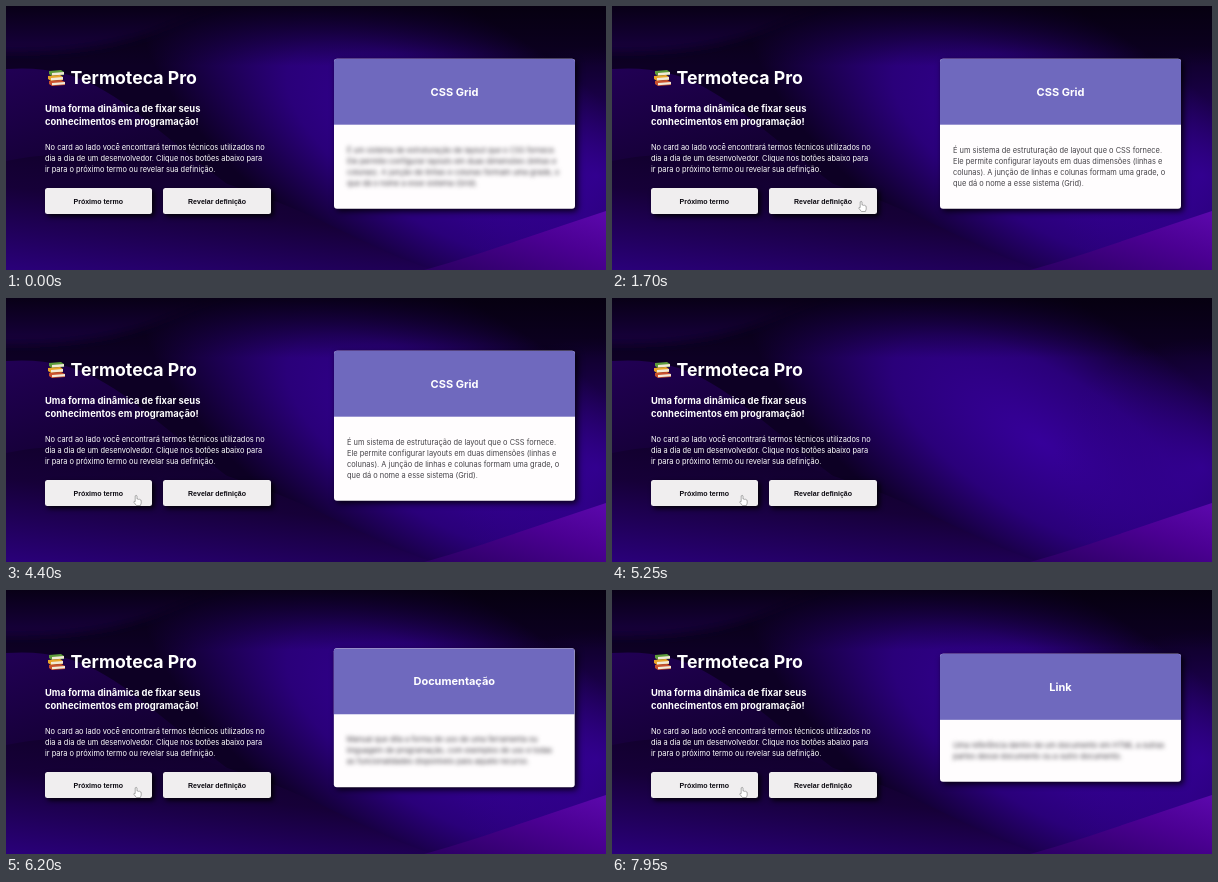
These frames come from a looping animation (600x264 px, 8 s). An HTML page:

```html
<!DOCTYPE html>
<html lang="pt-BR">
<head>
<meta charset="utf-8">
<title>Termoteca Pro</title>
<style>
  html, body { margin: 0; width: 100%; height: 100%; overflow: hidden; background: #090015; }
  body { position: relative; font-family: Inter, "Open Sans", sans-serif; color: #fff; white-space: nowrap; }
  body > * { position: absolute; margin: 0; }
  svg { display: block; overflow: visible; }
  #bg { left: 0; top: 0; }
  #books { left: 41px; top: 64px; }
  h1 { left: 64.6px; top: 60px; font: 700 17.7px/24px Inter, sans-serif; }
  h2 { left: 39px; top: 96px; font: 700 9.4px/13.3px Inter, sans-serif; }
  #intro { left: 39px; top: 135.6px; font-size: 7.43px; line-height: 11.1px; }
  button {
    top: 182px; width: 107.5px; height: 26.3px; padding: 0; border: 0; border-radius: 2.5px;
    background: #f0eeef; color: #0b0910; box-shadow: 2.5px 2.5px 5px #000d;
    font: 700 7px "Liberation Sans", Arial, sans-serif;
  }
  #next { left: 38.5px; }
  #reveal { left: 157.3px; }
  #card {
    left: 328px; top: 127.75px; width: 241px; border-radius: 3px; overflow: hidden;
    background: #fffdfe; box-shadow: 2.5px 2.5px 6px #000d;
  }
  #term { height: 66px; background: #6f69be; text-align: center; font: 700 11px/66px Inter, sans-serif; }
  #text { padding: 20px 13px; color: #454348; font-size: 7.45px; line-height: 11.15px; white-space: pre; }
  #hand { left: 0; top: 0; }
</style>
</head>
<body>
<svg id="bg" width="600" height="264">
  <defs>
    <radialGradient id="glow" gradientUnits="userSpaceOnUse" cx="0" cy="0" r="1"
      gradientTransform="translate(430 145) rotate(32) scale(340 140)">
      <stop offset="0" stop-color="#36009a"/>
      <stop offset=".5" stop-color="#2a007a"/>
      <stop offset="1" stop-color="#0d0024"/>
    </radialGradient>
    <radialGradient id="side" gradientUnits="userSpaceOnUse" cx="0" cy="0" r="1"
      gradientTransform="translate(590 170) scale(150 130)">
      <stop offset="0" stop-color="#36009a" stop-opacity=".8"/>
      <stop offset="1" stop-color="#30008a" stop-opacity="0"/>
    </radialGradient>
    <linearGradient id="left" x1="0" y1="0" x2=".55" y2="1">
      <stop offset="0" stop-color="#210054"/>
      <stop offset=".55" stop-color="#12002f"/>
      <stop offset="1" stop-color="#160039"/>
    </linearGradient>
    <linearGradient id="low" x1="0" y1="1" x2=".45" y2="0">
      <stop offset="0" stop-color="#2a007a"/>
      <stop offset=".6" stop-color="#160038"/>
      <stop offset="1" stop-color="#10002a"/>
    </linearGradient>
    <linearGradient id="hill" x1="0" y1="1" x2="1" y2="0">
      <stop offset="0" stop-color="#2b0062"/>
      <stop offset=".6" stop-color="#4b0093"/>
      <stop offset="1" stop-color="#5c08ad"/>
    </linearGradient>
    <linearGradient id="top" x1="0" y1="0" x2="0" y2="1">
      <stop offset="0" stop-color="#05000d" stop-opacity=".85"/>
      <stop offset="1" stop-color="#05000d" stop-opacity="0"/>
    </linearGradient>
    <filter id="soft"><feGaussianBlur stdDeviation="5"/></filter>
  </defs>
  <rect width="600" height="264" fill="url(#glow)"/>
  <rect width="600" height="264" fill="url(#side)"/>
  <path d="M-20 45Q90 50 160 20T290-20H-20Z" fill="#1d004b" filter="url(#soft)"/>
  <path d="M0 63C70 58 105 85 160 130S265 210 330 264H0Z" fill="url(#left)"/>
  <path d="M0 155C90 136 170 160 245 186S365 244 428 264H0Z" fill="url(#low)"/>
  <rect width="600" height="60" fill="url(#top)"/>
  <path d="M418 264C470 250 535 226 600 205V264Z" fill="url(#hill)"/>
</svg>

<svg id="books" width="18" height="16">
  <path d="M2 1L14 0L17 2V5L5 6L2 4Z" fill="#5d9c3b"/>
  <path d="M5 3L17 2V4.5L5 5.4Z" fill="#f1ead8"/>
  <path d="M1 6L13 5L16 7V10L4 11L1 9Z" fill="#e9a52b"/>
  <path d="M4 8L16 7V9.5L4 10.4Z" fill="#f1ead8"/>
  <path d="M2 11L14 10L18 12V15L5 16L2 14Z" fill="#c9502d"/>
  <path d="M5 13L18 12V14.3L5 15.3Z" fill="#f1ead8"/>
</svg>
<h1>Termoteca Pro</h1>
<h2>Uma forma dinâmica de fixar seus<br>conhecimentos em programação!</h2>
<p id="intro">No card ao lado você encontrará termos técnicos utilizados no<br>dia a dia de um desenvolvedor. Clique nos botões abaixo para<br>ir para o próximo termo ou revelar sua definição.</p>
<button id="next">Próximo termo</button>
<button id="reveal">Revelar definição</button>
<div id="card"><div id="term"></div><div id="text"></div></div>
<svg id="hand" width="9" height="12">
  <path d="M2.2 7V1.4Q3.1.2 4 1.4V4.6Q5 4 5.6 4.9Q6.6 4.4 7.1 5.3Q8.2 5 8.2 6.4V8.6L7.4 11H3.4L.8 7.7Q.8 6.4 2.2 7Z"
    fill="#fff" stroke="#777" stroke-width=".6" stroke-linejoin="round"/>
</svg>

<script>
const LOOP = 8000, BOUNCE = 1000, REVEAL = 850, FADE = 300;
const $ = id => document.getElementById(id);
const card = $('card'), term = $('term'), text = $('text'), hand = $('hand');

const cards = [
  { at: -BOUNCE, term: 'CSS Grid', text:
`É um sistema de estruturação de layout que o CSS fornece.
Ele permite configurar layouts em duas dimensões (linhas e
colunas). A junção de linhas e colunas formam uma grade, o
que dá o nome a esse sistema (Grid).` },
  { at: 5245, term: 'Documentação', text:
`Manual que dita a forma de uso de uma ferramenta ou
linguagem de programação, com exemplos de uso e todas
as funcionalidades disponíveis para aquele recurso.` },
  { at: 6945, term: 'Link', text:
`Uma referência dentro de um documento em HTML a outras
partes desse documento ou a outro documento.` }
];

// bounce in from the right: progress, x, horizontal scale, opacity
const bounce = [[0, 1500, 3, 0], [.6, -12.5, 1, 1], [.75, 5, .98, 1], [.9, -2.5, .995, 1], [1, 0, 1, 1]];

// pointer stops: time, x, y
const stops = [[50, 330, 275], [700, 250, 200], [1900, 250, 200], [3300, 200, 201],
  [3650, 200, 201], [4300, 131, 202], [LOOP, 131, 202]];

const clamp = v => Math.min(1, Math.max(0, v));
const smooth = v => v * v * (3 - 2 * v);

// cubic-bezier(.215, .61, .355, 1)
function easeOut(x) {
  const curve = (s, a, b) => 3 * s * (1 - s) ** 2 * a + 3 * s * s * (1 - s) * b + s ** 3;
  let lo = 0, hi = 1;
  for (let i = 0; i < 20; i++) {
    const mid = (lo + hi) / 2;
    if (curve(mid, .215, .355) < x) lo = mid; else hi = mid;
  }
  return curve(hi, .61, 1);
}

// values of a keyframe list at time t, eased within each segment
function at(keys, t, ease) {
  const next = keys.findIndex(k => k[0] > t);
  const i = next < 0 ? keys.length - 1 : Math.max(1, next);
  const [t0, ...from] = keys[i - 1], [t1, ...to] = keys[i];
  const k = ease(clamp((t - t0) / (t1 - t0)));
  return from.map((v, j) => v + (to[j] - v) * k);
}

let shown;
function draw(t) {
  const now = cards.findLast(c => t >= c.at);
  if (now !== shown) {
    shown = now;
    term.textContent = now.term;
    text.textContent = now.text;
  }
  const [shift, scale, opacity] = at(bounce, (t - now.at) / BOUNCE, easeOut);
  card.style.transform = `translate(${shift}px, -50%) scaleX(${scale})`;
  card.style.opacity = opacity;
  const blur = now === cards[0] ? 2 * (1 - smooth(clamp((t - REVEAL) / FADE))) : 2;
  text.style.filter = blur ? `blur(${blur}px)` : 'none';
  const [x, y] = at(stops, t, smooth);
  hand.style.transform = `translate(${x - 4}px, ${y - 5.5}px)`;
}

function tick() {
  draw(performance.now() % LOOP);
  requestAnimationFrame(tick);
}
tick();
</script>
</body>
</html>
```
